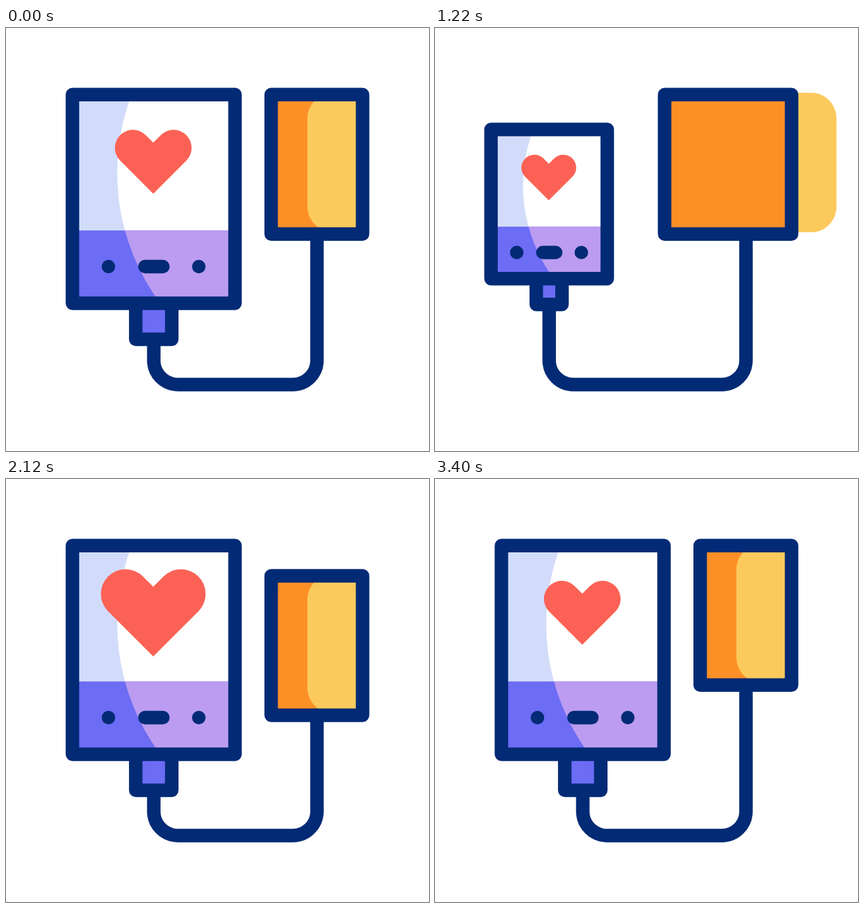
Write an HTML page that moves like this. It is 640x640 px and loops after 3.6 s.

```html
<!DOCTYPE html>
<html lang="en">
<head>
<meta charset="utf-8">
<title>Blood pressure monitor</title>
<style>
  html, body { margin: 0; width: 100%; height: 100%; overflow: hidden; background: #fff; }
  svg { display: block; width: 640px; height: 640px; }
  .line {
    fill: none; stroke: #022a75; stroke-width: 20.4;
    stroke-linecap: round; stroke-linejoin: round;
    vector-effect: non-scaling-stroke;
  }
</style>
</head>
<body>
<svg viewBox="0 0 640 640">
  <defs>
    <clipPath id="lit"><path d="M190.3 100A333 333 0 0 0 232.8 416H347V100Z"/></clipPath>
  </defs>

  <path id="cable" class="line"/>

  <g id="monitor">
    <path d="M196.3 416.5V471H250.8V416.5Z" fill="#6c6cf4"/>
    <path class="line" d="M196.3 416.5V471H250.8V416.5"/>
    <path d="M100.5 100.5H346.7V306.3H100.5Z" fill="#d2dcfa"/>
    <path d="M100.5 306.3H346.7V416.5H100.5Z" fill="#6c6cf4"/>
    <g clip-path="url(#lit)">
      <path d="M100 100H347V306.3H100Z" fill="#fff"/>
      <path d="M100 306.3H347V417H100Z" fill="#bb9cf0"/>
    </g>
    <path id="heart" fill="#fb6255" d="M222.8 173.5L211 161.7A27.3 27.3 0 0 0 172.4 200.3L222.8 250.7L273.2 200.3A27.3 27.3 0 0 0 234.6 161.7Z"/>
    <path class="line" d="M155 361h.01M210.2 361H237.4M291.7 361h.01"/>
    <path class="line" d="M100.5 100.7H346.5V416.5H100.5Z"/>
  </g>

  <g id="cuff">
    <path id="cuffFill" fill="#fc9026"/>
    <path id="shine" fill="#fcca5c"/>
    <path id="cuffFrame" class="line"/>
  </g>
</svg>
<script>
  const LOOP = 3600;
  const SHRINK = .286;
  const byId = id => document.getElementById(id);
  const [cable, monitor, heart, cuff, cuffFill, shine, cuffFrame] =
    ['cable', 'monitor', 'heart', 'cuff', 'cuffFill', 'shine', 'cuffFrame'].map(byId);

  // Eased progress from 0 to 1 between two times
  function ease(t, start, end) {
    const x = Math.min(1, Math.max(0, (t - start) / (end - start)));
    return x * x * (3 - 2 * x);
  }

  const scaleAbout = (x, y, s) => `translate(${x} ${y}) scale(${s}) translate(${-x} ${-y})`;

  // Three heartbeats between 1800 and 3400 ms
  function heartScale(t) {
    if (t < 1800 || t > 3400) return 1;
    const beat = 1600 / 3;
    const phase = (t - 1800) % beat;
    return 1 + .41 * (ease(phase, 0, beat / 2) - ease(phase, beat / 2, beat));
  }

  function draw(t) {
    const squeeze = ease(t, 200, 800) - ease(t, 1200, 1800);
    const drop = 51 * (ease(t, 1800, 2200) - ease(t, 3000, 3400));
    const scale = 1 - SHRINK * squeeze;

    monitor.setAttribute('transform', scaleAbout(45.1, 286, scale));
    heart.setAttribute('transform', scaleAbout(222.8, 202.1, heartScale(t)));

    const plugX = 45.1 + (223.6 - 45.1) * scale;
    const plugY = 286 + (471 - 286) * scale;
    cable.setAttribute('d', `M${plugX} ${plugY}V503a36.5 36.5 0 0 0 36.5 36.5` +
      `H434a36.5 36.5 0 0 0 36.5 -36.5V${311.7 + drop}`);

    const left = 401.2 - 54 * squeeze;
    const frame = `M${left} 100.7H539.5V311.7H${left}Z`;
    cuffFill.setAttribute('d', frame);
    cuffFrame.setAttribute('d', frame);

    // The highlight's rounded edge swings past its fixed right side
    const edge = 456 + 152 * squeeze;
    const corner = 495 + 75 * squeeze;
    const bend = corner + (edge - corner) * .55;
    shine.setAttribute('d', `M539.5 98H${corner}C${bend} 98 ${edge} 115.5 ${edge} 137` +
      `V270C${edge} 291.5 ${bend} 309 ${corner} 309H539.5Z`);
    cuff.setAttribute('transform', `translate(0 ${drop})`);
  }

  const begin = performance.now();
  function tick() {
    draw((performance.now() - begin) % LOOP);
    requestAnimationFrame(tick);
  }
  tick();
</script>
</body>
</html>
```
